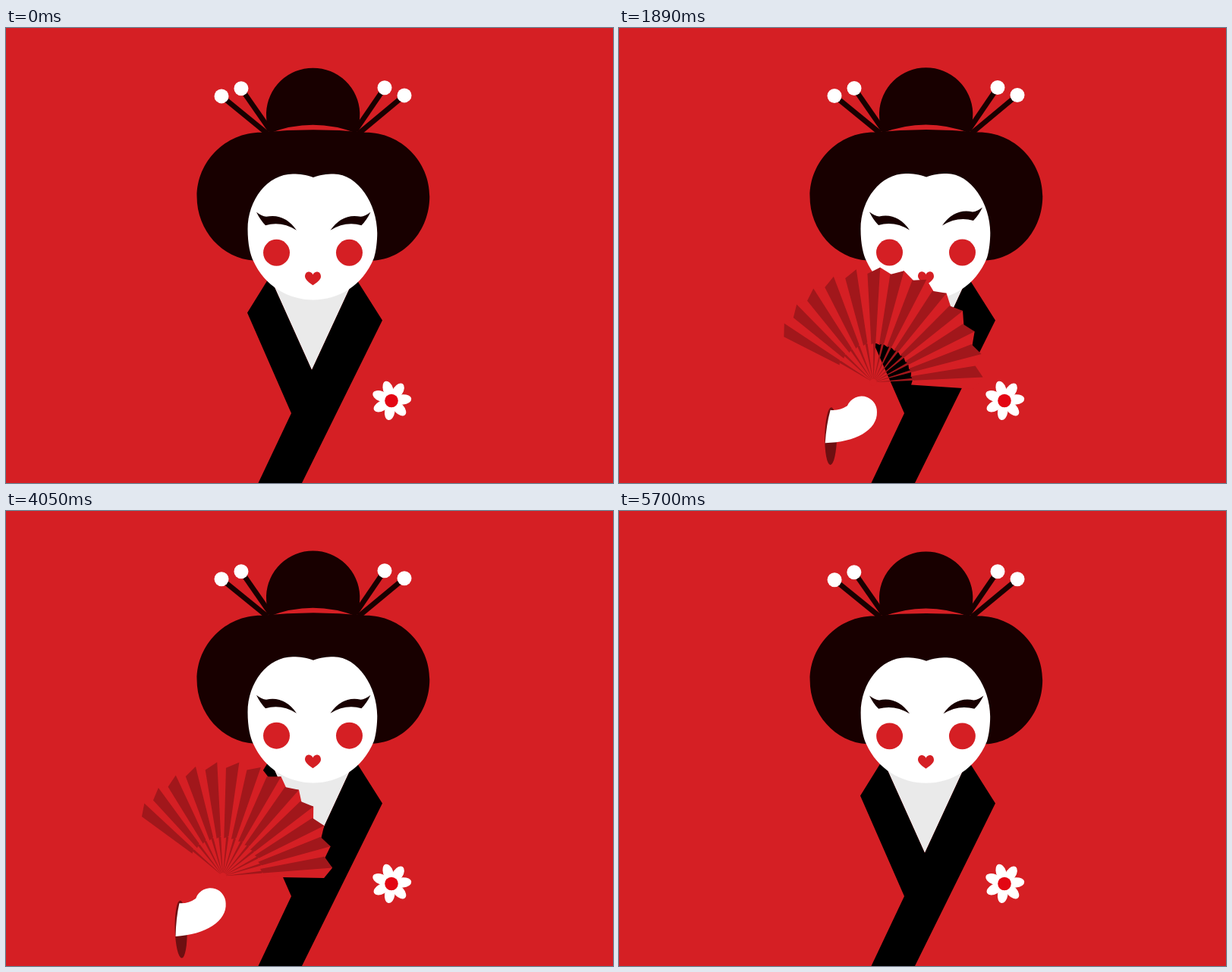
Write an HTML page with a canvas that moves like this. It is 800 px wide and 600 px high and loops after 5.73 s.

```html
<!DOCTYPE html>
<html lang="en">
<head>
<meta charset="utf-8">
<title>Geisha with a fan</title>
<style>
html, body { margin: 0; width: 100%; height: 100%; overflow: hidden; background: #d51f24; }
canvas { display: block; width: 800px; height: 600px; }
</style>
</head>
<body>
<canvas id="stage" width="800" height="600"></canvas>
<script>
const ctx = document.getElementById('stage').getContext('2d');
const LOOP = 5730;
const RED = '#d51f24', DARK = '#a1171b', CUFF = '#6e0f11', HAIR = '#180000';
const RAD = Math.PI / 180, TURN = 2 * Math.PI;
const AXIS = 404.5;

const lerp = (a, b, k) => a + (b - a) * k;
const clamp = k => Math.min(1, Math.max(0, k));
const easeInOut = k => k < 0.5 ? 4 * k ** 3 : 1 - 4 * (1 - k) ** 3;
const ramp = (t, from, to) => easeInOut(clamp((t - from) / (to - from)));

function fillPath(d, color) {
  ctx.fillStyle = color;
  ctx.fill(new Path2D(d));
}

function oval(x, y, rx, ry, color, angle = 0) {
  ctx.fillStyle = color;
  ctx.beginPath();
  ctx.ellipse(x, y, rx, ry, angle, 0, TURN);
  ctx.fill();
}

const disc = (x, y, r, color) => oval(x, y, r, r, color);

function polygon(points, color) {
  ctx.fillStyle = color;
  ctx.beginPath();
  points.forEach(([x, y]) => ctx.lineTo(x, y));
  ctx.fill();
}

function placed(x, y, angle, draw) {
  ctx.save();
  ctx.translate(x, y);
  ctx.rotate(angle);
  draw();
  ctx.restore();
}

function drawBody() {
  fillPath('M348.6 330H459L403 451Z', '#eaeaea');
  fillPath('M363 303L318 375.5L376 508L332.5 600H390L496 385.5L447 308L459 330L403 451L348.6 330Z', '#000');
}

function drawFlower() {
  const petals = 7;
  for (let i = 0; i < petals; i++)
    placed(508, 491, -107 * RAD + i * TURN / petals, () => oval(15, 0, 11.3, 6.7, '#fff'));
  disc(508, 491, 11, '#fff');
  disc(508, 491.5, 8.8, '#e30613');
}

// Shifts heights y0 and y1 down by d0 and d1 and scales the width around the head axis.
function withBow(bow, y0, d0, y1, d1, widen, draw) {
  const slope = bow * (d1 - d0) / (y1 - y0);
  const sx = 1 + bow * widen;
  ctx.save();
  ctx.transform(sx, 0, 0, 1 + slope, AXIS * (1 - sx), bow * d0 - slope * y0);
  draw();
  ctx.restore();
}

function drawPin(x, y, baseX, baseY) {
  ctx.strokeStyle = HAIR;
  ctx.lineWidth = 6.8;
  ctx.beginPath();
  ctx.moveTo(x, y);
  ctx.lineTo(baseX, baseY);
  ctx.stroke();
  disc(x, y, 9.5, '#fff');
}

function drawPins(bow) {
  for (const side of [-1, 1]) {
    const tilt = -0.5 * side;
    drawPin(AXIS + side * 120.5 + 4 * bow, 89 + tilt + 87 * bow,
      AXIS + side * (60.5 + 6 * bow), 138.5 + 66 * bow);
    drawPin(AXIS + side * (94.5 + 7 * bow) - 4 * bow, 79 + tilt + 77 * bow,
      AXIS + side * (56 + 6 * bow), 135 + 62 * bow);
  }
}

function drawBrow() {
  fillPath('M330 242.5Q337 248 343 248.5Q367 243.5 383 266.5Q363 254 342 260Q335 253 330 242.5Z', HAIR);
}

function drawHead(bow, lift) {
  drawPins(bow);
  withBow(bow, 50, 78, 138, 66, 0.016, () => fillPath(
    `M347 138.5C343.5 128 343 119 343 111.5A61.7 61.7 0 0 1 466.3 111.5C466.3 119 466 128 462 138.5Q404.5 ${116.5 - 15 * bow} 347 138.5Z`, HAIR));
  withBow(bow, 134, 68, 306, 52, -0.054, () => fillPath(
    'M336 137.5Q405 130.5 474 137.5C521 137.5 558.3 176 558.3 222C558.3 267 525 305 483 306.5H327C285 304 251.5 267 251.5 222C251.5 176 289 137.5 336 137.5Z', HAIR));
  withBow(bow, 197, 88, 358, 36, -0.094, () => fillPath(
    'M405 196.5C395 193 388 192 378 192C345 192 318.5 226 318.5 265C318.5 285 322 299 326 307C341 340 372 358.3 405 358.3C438 358.3 470 340 485 303C488 294 489.3 280 489.3 270C489.3 232 464 192 432 192C422 192 415 193 405 196.5Z', '#fff'));
  withBow(bow, 243, 64, 267, 54, -0.05, () => {
    drawBrow();
    ctx.translate(2 * AXIS + 1.5 * (1 - lift), -6 * lift);
    ctx.scale(-1, 1);
    drawBrow();
  });
  for (const side of [-1, 1])
    disc(AXIS + side * (48 - 6 * bow), 296 + 57 * bow, 17.5 - 3 * bow, RED);
  withBow(bow, 321, 52, 339, 44, 0, () => fillPath(
    'M404.5 325C402 319.5 394 320 394 327.5C394.5 332 400 336 404.5 339C409 336 415 332 415 327.5C415 320 407 319.5 404.5 325Z', RED));
}

const BLADES = 13, OPEN_SPAN = 143.8;

function drawFan(x, y, lastAngle, open) {
  const polar = (deg, r) => [x + r * Math.cos(deg * RAD), y + r * Math.sin(deg * RAD)];
  const step = open * OPEN_SPAN / (BLADES - 1);
  const angleOf = i => lastAngle - step * (BLADES - 1 - i);
  const reach = i => lerp(145.5, 152.5 - 0.27 * (i - 6.6) ** 2, open);
  const low = 6.5, dip = 8.5;

  for (let i = 0; i < BLADES; i++) {
    const a = angleOf(i);
    polygon([[x, y], polar(a - 3.4, 52), polar(a, 53)], DARK);
  }
  for (let i = 0; i < BLADES; i++) {
    const a = angleOf(i), next = a + Math.max(step - low, 0);
    // The pale fold starts a little under its dark neighbour so that no seam shows.
    polygon([polar(a - 1, 52), polar(a - 1, reach(i) - 2), polar(a, reach(i)),
      polar(next + open, reach(i + 1) - dip), polar(next + open, 50)], RED);
  }
  for (let i = 0; i < BLADES; i++) {
    const a = angleOf(i);
    polygon([polar(a - low, 50), polar(a - low, reach(i) - dip),
      polar(a, reach(i)), polar(a, 53)], DARK);
  }
  if (open > 0.05) disc(x, y, 4.5, RED);
}

// "flat" turns the bent, holding hand into the stretched, showing one.
function drawHand(x, y, rotation, flat) {
  const mix = (bent, stretched) => lerp(bent, stretched, flat);
  const r = 20.3;
  const wristX = mix(-4.5, -44.5), wristY = mix(48, 19.5), wristAngle = mix(64.6, 99) * RAD;
  const along = k => [wristX + k * Math.cos(wristAngle), wristY + k * Math.sin(wristAngle)];
  const crook = mix(113, 202) * RAD, exit = mix(300, 362) * RAD;

  placed(x, y, rotation * RAD, () => {
    placed(wristX, wristY, wristAngle, () => oval(12, -6, 38, 8, CUFF, -8 * RAD));
    ctx.fillStyle = '#fff';
    ctx.beginPath();
    ctx.moveTo(...along(-22));
    ctx.quadraticCurveTo(mix(-12, -29), mix(28, -1), r * Math.cos(crook), r * Math.sin(crook));
    ctx.arc(0, 0, r, crook, exit);
    ctx.bezierCurveTo(mix(38, 21), mix(5, 24), mix(36, -8), mix(42, 41), ...along(22));
    ctx.quadraticCurveTo(wristX - 2, wristY - 2, ...along(-22));
    ctx.fill();
  });
}

function drawHandAndFan(t) {
  const below = 1 - ramp(t, 200, 820);
  const show = ramp(t, 1000, 1230);
  const overshoot = show - ramp(t, 1230, 1700);
  const sway = ramp(t, 1700, 2480) - 1.3 * ramp(t, 2480, 3600);
  const back = ramp(t, 3600, 3960);
  const drop = Math.max(0, (t - 3960) / 330) ** 2;
  const shut = clamp(drop);

  const x = 282 + 43 * below + 37.5 * show + 9 * overshoot + 3 * sway - 51 * back + 23 * drop;
  const y = 432 + 328 * below + 73.7 * show - 1.5 * overshoot + 3.6 * sway + 6 * back + 91 * drop;
  const pivotX = x + 2 + 13.5 * show + 13.5 * shut;
  const pivotY = y - 7 - 31.7 * show + 33.7 * shut;
  drawFan(pivotX, pivotY, -103 + 100.3 * show + 5 * overshoot - 2 * back + 4.7 * drop, show * (1 - shut));
  drawHand(x, y, -4 * back + 22 * drop, show - 0.1 * shut);
}

function render(t) {
  const late = t < 60 ? t + LOOP : t;
  const bow = ramp(late, 3995, 4585) - ramp(late, 5220, 5790);
  const lift = ramp(t, 1250, 1800) - ramp(t, 2400, 3500);
  ctx.fillStyle = RED;
  ctx.fillRect(0, 0, 800, 600);
  drawBody();
  drawFlower();
  drawHead(bow, lift);
  drawHandAndFan(t);
}

const start = performance.now();
function tick() {
  render((performance.now() - start) % LOOP);
  requestAnimationFrame(tick);
}
tick();
</script>
</body>
</html>
```
